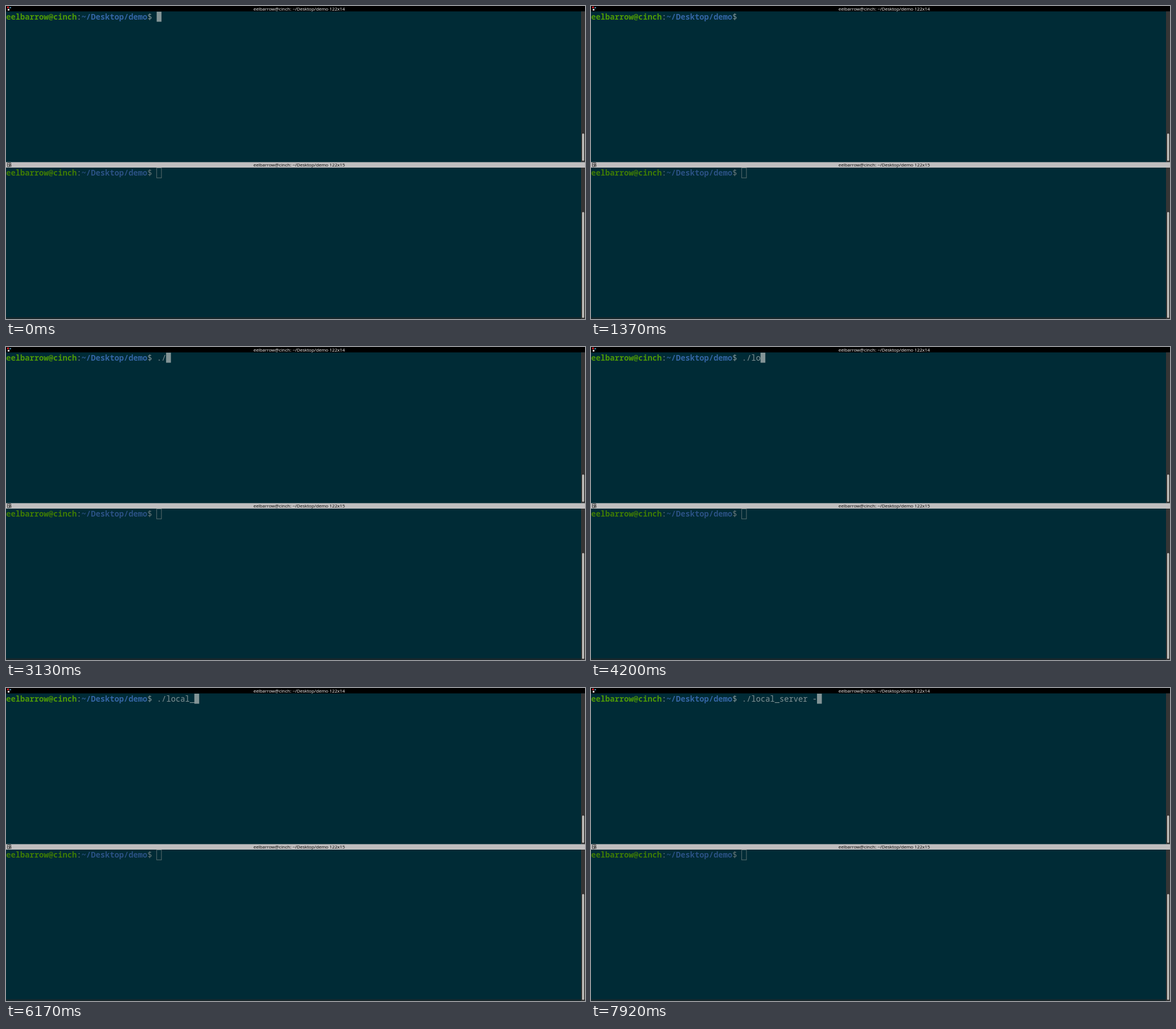
An HTML page that plays this animation: 1017 by 550 pixels, repeating every 8 s.

```html
<!DOCTYPE html>
<html lang="en">
<head>
<meta charset="utf-8">
<title>Split terminal</title>
<style>
  html, body { margin: 0; width: 100%; height: 100%; overflow: hidden; background: #002b36; }
  svg { display: block; width: 1017px; height: 550px; }
  text { white-space: pre; }
  .line { font: 13.78px "Noto Sans Mono", "DejaVu Sans Mono", monospace; fill: #839496; }
  .bold { font-weight: 700; }
  .user { fill: #4e9a06; }
  .path { fill: #3465a4; }
  .dim .line { fill: #667677; }
  .dim .user { fill: #3e7b05; }
  .dim .path { fill: #2a5183; }
  .title { font: 8px "Open Sans", "Noto Sans", sans-serif; text-anchor: middle; }
  .track { fill: #353535; }
  .thumb { fill: #c4c2be; }
</style>
</head>
<body>
<svg id="stage" viewBox="0 0 1017 550" xmlns="http://www.w3.org/2000/svg">
  <rect width="1017" height="550" fill="#002b36"/>
  <rect y="547" width="1017" height="3" fill="#17272c"/>

  <rect width="1017" height="9.5" fill="#000"/>
  <g shape-rendering="crispEdges">
    <rect x="2" y="1" width="3" height="3" fill="#d3222a"/>
    <rect x="6" y="2" width="3" height="2" fill="#4b87a8"/>
    <rect x="3" y="5" width="3" height="3" fill="#eee"/>
  </g>
  <rect class="track" x="1010" y="9.5" width="7" height="265"/>
  <rect class="thumb" x="1012" y="224" width="3.4" height="48" rx="1.5"/>

  <rect y="274.4" width="1017" height="9.6" fill="#c0bebf"/>
  <path d="M2.5 275.5h6v3.5h-6zM2.5 279v3.5h3.5v-7M6.5 279.5h2.5v2.5h-2.5z" fill="none" stroke="#222" stroke-width=".8"/>
  <rect class="track" x="1010" y="284" width="7" height="266"/>
  <rect class="thumb" x="1012" y="362" width="3.4" height="186" rx="1.5"/>

  <g id="upper"></g>
  <g id="lower" class="dim"></g>
  <rect x="264.7" y="284.5" width="8.3" height="17.5" fill="none" stroke="#667677" stroke-width=".9"/>
  <rect id="cursor" y="10" width="8.5" height="17.6" fill="#839496"/>
  <path id="pointer" d="M0 .5h1.5l.5 .5l.5 -.5h1.5M2 1v8M0 9.5h1.5l.5 -.5l.5 .5h1.5" fill="none" stroke="#c8d0d0" stroke-width=".9"/>
</svg>
<script>
const LOOP = 8000;
const CELL = 8.27;
const USER = "eelbarrow@cinch";
const PATH = "~/Desktop/demo";
const COMMAND = "./local_server -";
const START = USER.length + PATH.length + 3;

// [time, characters typed, cursor shown]
const typing = [
  [0, 0, 1], [110, 0, 0], [790, 0, 1], [1370, 0, 0], [1950, 0, 1], [2540, 0, 0],
  [3030, 1, 1], [3130, 2, 1], [3720, 2, 0], [4010, 3, 1], [4200, 4, 1],
  [4590, 5, 1], [5090, 5, 0], [5380, 6, 1], [5480, 7, 1], [6170, 8, 1],
  [6270, 9, 1], [6470, 10, 1], [6560, 11, 1], [6760, 12, 1], [6850, 13, 1],
  [6940, 14, 1], [7530, 15, 1], [7920, 16, 1]
];

// [time, x, y, shown]
const pointing = [
  [0, 0, 0, 0], [310, 603, 128, 1], [400, 508, 111, 1],
  [500, 412, 88, 1], [590, 364, 77, 1], [1180, 0, 0, 0]
];

const $ = id => document.getElementById(id);

function addText(parent, x, y, content, className) {
  const node = document.createElementNS("http://www.w3.org/2000/svg", "text");
  node.setAttribute("x", x);
  node.setAttribute("y", y);
  node.setAttribute("class", className);
  node.textContent = content;
  parent.append(node);
  return node;
}

function addPrompt(pane, y) {
  let col = 0;
  for (const [content, style] of [[USER, "bold user"], [":", ""], [PATH, "bold path"], ["$", ""]]) {
    addText(pane, col * CELL + 0.3, y, content, "line " + style);
    col += content.length;
  }
}

function addTitle(pane, y, size, color) {
  addText(pane, 515, y, `${USER}: ${PATH} ${size}`, "title").style.fill = color;
}

addTitle($("upper"), 7.6, "122x14", "#fff");
addTitle($("lower"), 282, "122x15", "#000");
addPrompt($("upper"), 24);
addPrompt($("lower"), 298.3);
const typed = addText($("upper"), START * CELL + 0.3, 24, "", "line");
const cursor = $("cursor");
const pointer = $("pointer");

const stepAt = (steps, t) => steps.findLast(step => step[0] <= t);
const show = (node, on) => node.setAttribute("visibility", on ? "visible" : "hidden");

function draw(t) {
  const [, count, blink] = stepAt(typing, t);
  typed.textContent = COMMAND.slice(0, count);
  cursor.setAttribute("x", (START + count) * CELL);
  show(cursor, blink);

  const [, x, y, shown] = stepAt(pointing, t);
  pointer.setAttribute("transform", `translate(${x} ${y})`);
  show(pointer, shown);
}

const begin = performance.now();
function tick() {
  draw((performance.now() - begin) % LOOP);
  requestAnimationFrame(tick);
}
tick();
</script>
</body>
</html>
```
